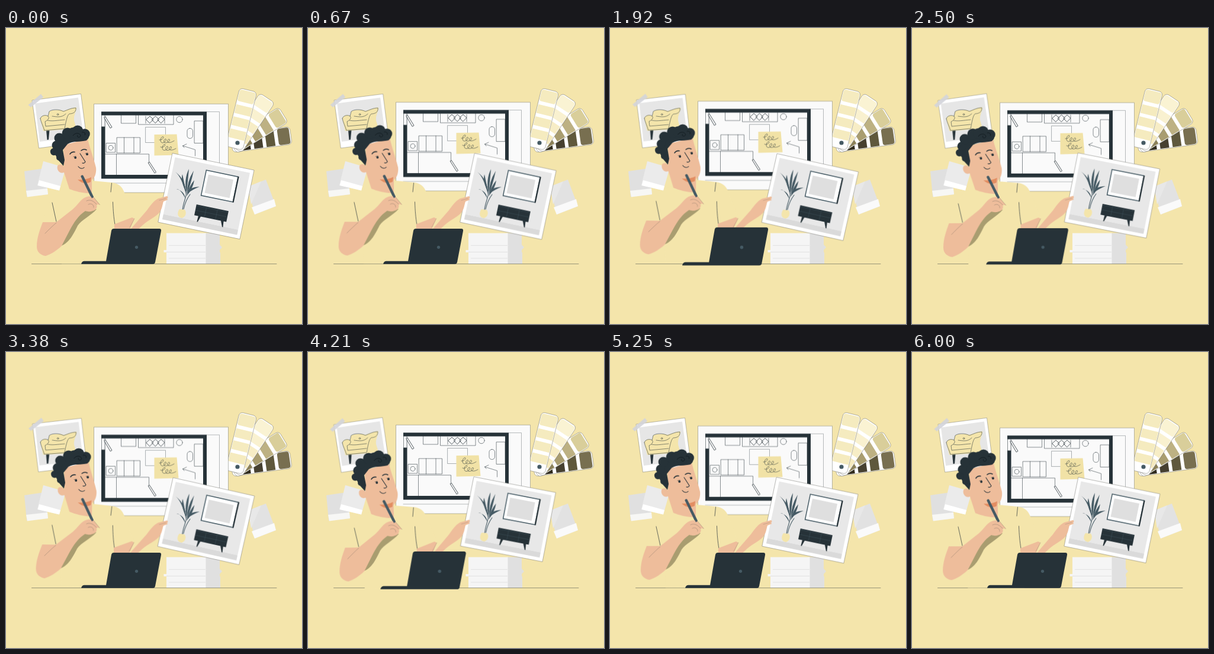
Recreate the animation shown at these times as an HTML page. Size 500x500 px, loop 6.04 s.

```html
<!DOCTYPE html>
<html lang="en">
<head>
<meta charset="utf-8">
<title>Interior planning</title>
<style>
  html, body { margin: 0; width: 100%; height: 100%; overflow: hidden; background: #f4e5ab; }
  svg { display: block; width: 100vw; height: 100vh; }
  .ln { fill: none; stroke: #263238; stroke-width: .55; stroke-linecap: round; stroke-linejoin: round; }
  .bold { stroke-width: 1.1; }
  .edge { stroke: #55564f; stroke-width: .4; }
  .dark { fill: #263238; }
  .slate { fill: #455a64; }
  .skin { fill: #eebd9b; }
  .cream { fill: #f4e5ab; }
  .white { fill: #fff; }
  #person { transform-origin: 235.5px 282px; }
  #polaroid { transform-origin: 86px 157px; }
  #laptop { transform-origin: 194.5px 368.8px; }
</style>
</head>
<body>
<svg viewBox="0 0 500 500">
  <g id="papers">
    <path fill="#e0e0e0" d="M31 242L65 237L71 281L35 285Z"/>
    <path fill="#f7f7f5" d="M34 275L70 271L71 281L36 285.500Z"/>
    <path fill="#ebebeb" d="M63 225L101 236L90 274.500L53 265.500Z"/>
    <path class="white" d="M56 257L92 267L90 274.500L53.500 266Z"/>
    <path fill="#e2e2e2" d="M409 268L439 256L456 301L420 315Z"/>
    <path fill="#e8e8e8" d="M409 268L431 259L414 298Z"/>
    <path fill="#fafafa" d="M415 303L453 289L456 301L420 315Z"/>
  </g>

  <g id="fan"></g>

  <g id="plan">
    <path class="edge" fill="#fafafa" d="M148.500 128.300H375.500V278H148.500Z"/>
    <path class="ln" stroke-opacity=".6" d="M339 141.500H360.500V262H161"/>
    <path class="dark" fill-rule="evenodd" d="M161 141.200H339V254.500H161ZM167.500 147.500V248H333V147.500Z"/>
    <path fill="#fafafa" d="M160.500 147.500H167.600V166.500H160.500Z"/>
    <path class="ln" d="M161.500 147.500V166.500M167 147.500V166.500"/>
    <path class="ln" d="M194.500 147.500V161H219.500V147.500M223.500 147.500V163H283V147.500M236 149V161M268 149V161
      M318.500 157H333V194.500H318.500ZM187.500 185H226.500V211H187.500ZM199.500 185V211M216 185V211
      M169.500 194.500H184.500V210H169.500ZM167.500 213H241.500V228M186.500 213V248
      M305 196L298.500 199L301 202M298.500 199L319.500 205.500V216"/>
    <path class="ln" stroke-opacity=".7" d="M236 167.500H269.500V193.500H236Z"/>
    <path class="ln" style="stroke-width:.8" d="M237 154.500L243 149L249 154.500L243 160.500ZM246.500 154.500L252.500 149L258.500 154.500L252.500 160.500ZM256 154.500L262 149L268 154.500L262 160.500Z"/>
    <circle class="ln" cx="293" cy="154.500" r="5.200"/>
    <circle class="ln" cx="177" cy="202.300" r="4"/>
    <rect class="ln" x="306" y="169.500" width="9.500" height="17" rx="4.500"/>
    <path class="ln" style="fill:#fafafa;stroke-width:.8" d="M166 151L168 150L179 167.500L176.500 169ZM240.500 227.500L242.500 226.500L253.500 243.500L251.500 245Z"/>
    <path fill="#f1e2a6" d="M250.500 180L288.500 179.500L291.500 214.500L250.500 215.500Z"/>
    <path class="ln" d="M259 189C264 190 268 184 265 183.500C261 184 259 193 264 194C268 194 272 189 270 187.500C267 187 265 193 269 194C274 194 278 190 276 188C273 187 271 193 275 193.500C278 194 281 192 284 190.500
      M261 201C266 203 271 197 268 196.500C264 197 262 206 267 206.500C271 207 275 202 273 200C270 199 268 206 272 206.500C277 207 281 202 279 200.500C276 200 274 206 278 206C282 206.500 284 205 287 203.500"/>
  </g>

  <g id="polaroid">
    <path class="white edge" d="M44 122L126.500 111.300L137 192L55.500 203Z"/>
    <path fill="#e6e6e6" d="M49 127.500L122 117.500L131 183L57 192Z"/>
    <path class="dark" d="M68 173L73.500 172L72 188.500L69.500 189Z"/>
    <path class="cream" d="M58 153C59 148 67 146 71 149L73 141C79 138 91 138 97 140C105 138 110 135 119 134C119 141 114 147 115 156L119 170L63 174Z"/>
    <path class="ln" d="M58 153C59 148 67 146 71 149L73 141C78 137 90 137 97 141C105 138 110 135 118 135C119 142 113 145 107 145C103 147 101 160 99 170L65 173C63 166 59 159 58 153
      M71 149C75 152 69 157 66 158L67 166L99 163M70 156C78 158 86 156 99 155M78 149C86 150 94 152 101 145"/>
    <circle class="ln" cx="87.500" cy="146" r="1.300"/>
    <path fill="#d3d4da" fill-opacity=".9" d="M37.500 130L59 111.500L63 117L42 134Z"/>
  </g>

  <g id="books">
    <path fill="#e0e0e0" d="M336 346.500H361V366L365 370.500L361 375V378L362 380V398.300H336Z"/>
    <path fill="#f5f5f5" d="M271 346.500H337.500V398.300H271V379H266.500V375H271Z"/>
    <path fill="none" stroke="#dcdcdc" stroke-width=".8" d="M275 367.300H337M271 378.500H337M275 389H337"/>
  </g>
  <path class="ln" style="stroke-width:.45" d="M43.500 398.500H457"/>

  <g id="person">
    <path class="cream" d="M104 270C90 275 80 283 76 296L60 330L95 340L94 398.300H190L216 336L217 321L200 278C196 267 189 262 178 261L146 258L140 276Z"/>
    <path class="ln" style="stroke-width:.7" d="M78 295L85 327M180.500 294C181 309 182 320 184 332M178.500 262L177 277"/>

    <path class="skin" d="M183 331.500L213 320L217 322L207 345H183Z"/>
    <g id="photo" transform="translate(281 211.500) rotate(11.700)">
      <path class="white edge" d="M0 0H141V119H0Z"/>
      <path fill="#e8e8e8" d="M6 6H135V104H6Z"/>
      <path fill="#dadada" d="M6 104H135V113H6Z"/>
      <path fill="#fff" stroke="#455a64" stroke-width="1.500" d="M62 16.500H117V60H62Z"/>
      <path fill="none" stroke="#263238" stroke-width="2.200" d="M117.300 16V60.500"/>
      <path fill="#dfdfdf" d="M67 23H110V54.500H67Z"/>
      <path class="dark" d="M57.500 76.500H112.800V95H57.500ZM64.500 94H69L65.500 105H64ZM103 94H108L109 105H107.500Z"/>
      <path fill="none" stroke="#455a64" stroke-width=".4" d="M58 78.500H112M75 79V94M94 79V94M58 86.500H112"/>
    </g>
    <g id="plant">
      <path class="ln bold" style="stroke:#455a64" d="M298 308C299 297 303 290 305 278M300 306C302 297 304 290 311 281"/>
    </g>
    <path class="cream" d="M293 306L302 307C306 312 303 320 297 321C290 320 288 313 293 306Z"/>
    <path class="skin" d="M206 345L238 308C244 300 248 293 257 288L272 284C274 285 274 287 272 288.500L273.500 290L266 293C264 299 264 306 258 313C251 320 240 325 232 332L218 345Z"/>
    <path class="ln" stroke-opacity=".35" d="M209 337L217 322M259 291L270 288"/>

    <path class="skin" d="M97 198L138 187C141 201 148 219 152 236C153 245 150 253 145 257L145 279C132 280 118 276 107 272L98 244C91 247 85 240 87 233C89 229 95 230 98 234Z"/>
    <path fill="#e28d62" d="M121 256C131 257 138 255 144 252L143 260C135 264 127 262 121 256Z"/>
    <g id="hair" class="dark">
      <path d="M84 192L105 172L128 171L139 184L136 190C126 193 113 190 104 196L96 206L99 223L97 233L89 224L79 207Z"/>
    </g>
    <path fill="none" stroke="#0f171b" stroke-width=".8" d="M113 182C117 176 125 177 126 182C125 186 119 185 121 181M128 176C132 175 135 178 133 181"/>
    <path class="ln bold" d="M125 212L134 226C133 228 131 229 129 228M122 234C125 238 130 238 132 235.500"/>
    <path class="ln" style="stroke-width:1.600" d="M108 213C110 210 113 209 116 209.500M127 207C130 204.500 133 204.500 136 206"/>
    <circle class="dark" cx="117.200" cy="219" r="2"/>
    <circle class="dark" cx="137" cy="213.300" r="2"/>
    <path class="ln" d="M114 217.500L118 216.500M134 212L138 211"/>

    <path fill="#a99d70" d="M93 368C107 363 114 348 121 334C127 324 144 317 153 306L128 303L102 345Z"/>
    <path class="slate" d="M126.300 250.800C126.500 248.300 129.500 247.500 130.700 249.700L148 285L144.500 288Z"/>
    <path class="skin" d="M62 328H85L113 306C121 299 125 291 132 287C137 284 144 283 148 286L158.500 298.500L153 298C155 303 152 308 146 309C142 311 137 310 134 309C122 317 115 328 108 341L94 368C86 376 76 382 67 385C58 384 52 378 52 369C52 355 57 341 62 328Z"/>
    <path class="ln" stroke-opacity=".45" d="M66 347C72 341 79 334 85 329M136 292C142 289 148 292 153 298M139 298C144 295 149 299 148 303M148 286L158.500 298.500"/>
    <path class="slate" d="M141.500 281L144.500 279.500L148 286L145 287.500Z"/>
  </g>

  <g id="laptop">
    <path class="dark" d="M127 398.700C128 395 130 393.800 133 393.800H169L178 342.500C178.500 340 180 339 182 339H259C261.500 339 262.500 340.500 262 343L252 395.500C251.500 398 250 398.700 248 398.700Z"/>
    <circle class="slate" cx="220.500" cy="370.300" r="2.600"/>
  </g>
</svg>
<script>
  const $ = id => document.getElementById(id);
  const add = (parent, tag, attrs) => {
    const el = document.createElementNS('http://www.w3.org/2000/svg', tag);
    for (const k in attrs) el.setAttribute(k, attrs[k]);
    return parent.appendChild(el);
  };

  // Colour cards: angle, sideways shift, swatches from the tip inwards
  const cards = [
    [82, 0, ['#786f50', '#5f583c', '#464030', '#302b1d']],
    [58.5, 0, ['#d9ce9a', '#bdb183', '#a99d70', '#8c8158']],
    [33.6, 0, ['#faf3d3', '#f9f1d0', '#f7edc6', '#f5eabf']],
    [13.8, -3.5, ['#f5ebbf', '#f5ebbf', '#f5ebbf', '#f5ebbf']]
  ];
  for (const [angle, shift, tones] of cards) {
    const g = add($('fan'), 'g', { transform: `translate(391 194) rotate(${angle}) translate(${shift} 0)` });
    add(g, 'rect', { x: -15, y: -91, width: 30, height: 101, rx: 6, class: 'white edge' });
    tones.forEach((fill, i) => add(g, 'rect', {
      x: -14, y: i ? -84 + i * 21 : -89, width: 28, height: i ? 15 : 20, rx: i ? 0 : 4, fill
    }));
  }
  add($('fan'), 'circle', { cx: 391, cy: 194, r: 3.6, class: 'slate' });

  // Leaves: base, bend and tip
  const leaves = [
    [304, 281, 299, 252, 286, 243], [305, 279, 296, 258, 298, 247],
    [305, 280, 302, 255, 309, 238], [306, 280, 307, 260, 317, 241],
    [307, 279, 310, 269, 327, 268], [303, 288, 296, 271, 288, 272],
    [305, 284, 311, 267, 318, 257]
  ];
  for (const [x, y, bx, by, tx, ty] of leaves)
    add($('plant'), 'path', { class: 'slate', d: `M${x} ${y}Q${bx - 2} ${by} ${tx} ${ty}Q${bx + 5} ${by + 4} ${x} ${y}` });

  const curls = [
    [81, 209, 6.2], [85, 198, 7.5], [90, 186, 8.5], [104, 178, 9.5], [121, 174, 9.4],
    [133, 179, 8.8], [133, 183, 7], [122, 183, 8], [113, 177, 9], [90, 219, 5]
  ];
  for (const [cx, cy, r] of curls) add($('hair'), 'circle', { cx, cy, r });

  const LOOP = 6040;
  const play = (id, steps, duration) => $(id).animate(
    steps.map(([offset, transform]) => ({ offset, transform })),
    { duration, iterations: Infinity, easing: 'linear' }
  ).startTime = 0;

  const sway = [[0, 'rotate(0deg)'], [.25, 'rotate(1deg)'], [.75, 'rotate(-1deg)'], [1, 'rotate(0deg)']];
  play('person', sway, LOOP / 4);
  play('polaroid', sway, LOOP / 4);
  play('plan', [[0, 'translateY(0px)'], [.5, 'translateY(-6.4px)'], [1, 'translateY(0px)']], LOOP / 2);

  // Double beat, one sixth of the loop late
  const beat = [[0, 1], [.1, 1.1], [.3, 1], [.4, 1], [.5, 1.1], [.6, 1]];
  play('laptop', [
    [0, 'scale(1)'],
    ...beat.map(([at, s]) => [at + 1 / 6, `scale(${s})`]),
    [1, 'scale(1)']
  ], LOOP);
</script>
</body>
</html>
```
